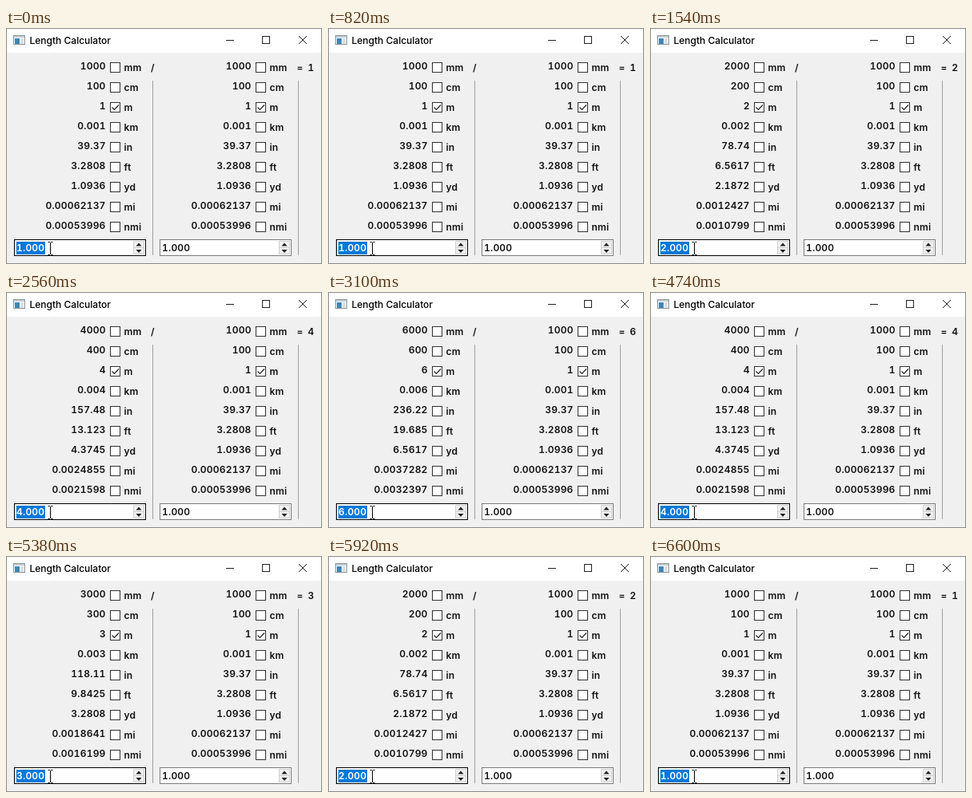
These frames come from a looping animation (395x296 px, 6.64 s). An HTML page:

```html
<!DOCTYPE html>
<html lang="en">
<head>
<meta charset="utf-8">
<title>Length Calculator</title>
<style>
  html, body { margin: 0; width: 100%; height: 100%; overflow: hidden; background: #f0f0f0; }
  svg { display: block; width: 395px; height: 296px; }
  text { font: 600 12px Inter, "Liberation Sans", sans-serif; font-variant-numeric: tabular-nums; letter-spacing: .2px; fill: #111; white-space: pre; }
  .title { font-weight: 500; letter-spacing: 0; fill: #000; }
  .num { text-anchor: end; }
  .crisp { shape-rendering: crispEdges; }
  .line { fill: none; stroke: #222; }
</style>
</head>
<body>
<svg id="stage" viewBox="0 0 395 296" xmlns="http://www.w3.org/2000/svg">
  <rect width="395" height="296" fill="#f0f0f0"/>
  <rect width="395" height="31" fill="#fff"/>
  <g class="crisp">
    <rect x="9.5" y="9.5" width="14" height="11" fill="#f8fafb" stroke="#8b969d"/>
    <rect x="10" y="10" width="13" height="2" fill="#c4ced4"/>
    <rect x="11" y="13" width="6" height="7" fill="#3f86b5"/>
    <rect x="18" y="13" width="4" height="7" fill="#d9e1e5"/>
  </g>
  <text class="title" x="29.5" y="20">Length Calculator</text>
  <path class="line crisp" d="M275 15.5h10M320.5 10.5h9v9h-9z"/>
  <path class="line" d="M366 10l10 10M376 10l-10 10"/>
  <g id="form"></g>
  <path d="M52.5 268.5h2l1 1 1-1h2M55.5 269.5v14M52.5 284.5h2l1-1 1 1h2" fill="none" stroke="#000"/>
  <rect class="crisp" x=".5" y=".5" width="394" height="295" fill="none" stroke="#8a8a8a"/>
</svg>
<script>
  const LOOP = 6640;
  const STEPS = [[0, 1], [1460, 2], [1860, 3], [2260, 4], [2660, 5], [3060, 6],
                 [4100, 5], [4640, 4], [5180, 3], [5720, 2], [6260, 1]];
  const UNITS = { mm: .001, cm: .01, m: 1, km: 1000, in: .0254, ft: .3048, yd: .9144, mi: 1609.344, nmi: 1852 };
  const names = Object.keys(UNITS);
  const form = document.getElementById("form");
  const format = (metres, unit) => String(Number((metres / UNITS[unit]).toPrecision(5)));

  function add(tag, attrs, text = "") {
    const el = document.createElementNS("http://www.w3.org/2000/svg", tag);
    for (const key in attrs) el.setAttribute(key, attrs[key]);
    el.textContent = text;
    return form.appendChild(el);
  }

  function spinBox(x, focused) {
    const rect = (dx, y, width, height, fill, stroke = "none") =>
      add("rect", { class: "crisp", x: x + dx, y, width, height, fill, stroke });
    rect(.5, 265.5, 164, 20, "#fff", focused ? "#000" : "#7a7a7a");
    if (focused) rect(3, 268, 36, 16, "#0078d7");
    rect(149.5, 267.5, 13, 8, "#f0f0f0", "#d0d0d0");
    rect(149.5, 275.5, 13, 8, "#f0f0f0", "#d0d0d0");
    add("path", { d: `M${x + 152.5} 273.5l3.5 -4 3.5 4zM${x + 152.5} 278l3.5 4 3.5 -4z`, fill: "#222" });
    return add("text", { x: x + 3, y: 280, style: focused ? "fill:#fff" : "" }, "1.000");
  }

  function column(x, focused) {
    const cells = names.map((unit, row) => {
      const y = 25 * row;
      add("rect", { class: "crisp", x: x + 120.5, y: y + 43.5, width: 12, height: 12, fill: "#fff", stroke: "#333" });
      if (unit === "m")
        add("path", { class: "line", d: `M${x + 122.5} ${y + 49.5}l3 3 5.5 -6`, "stroke-width": 1.2 });
      add("text", { x: x + 137.5, y: y + 54 }, unit);
      return add("text", { class: "num", x: x + 114.6, y: y + 52 }, format(1, unit));
    });
    add("path", { class: "crisp", d: `M${x + 173.5} 66v219`, stroke: "#a0a0a0" });
    return { cells, field: spinBox(x, focused) };
  }

  const left = column(10, true);
  column(192, false);
  add("text", { x: 181, y: 54 }, "/");
  add("text", { x: 363.5, y: 54 }, "=");
  const ratio = add("text", { x: 377.2, y: 54 }, "1");

  let shown = 1;
  function show(value) {
    if (value === shown) return;
    shown = value;
    left.cells.forEach((cell, i) => cell.textContent = format(value, names[i]));
    left.field.textContent = value.toFixed(3);
    ratio.textContent = value;
  }

  const start = performance.now();
  function frame() {
    const t = (performance.now() - start) % LOOP;
    show(STEPS.filter(([at]) => at <= t).pop()[1]);
    requestAnimationFrame(frame);
  }
  frame();
</script>
</body>
</html>
```
